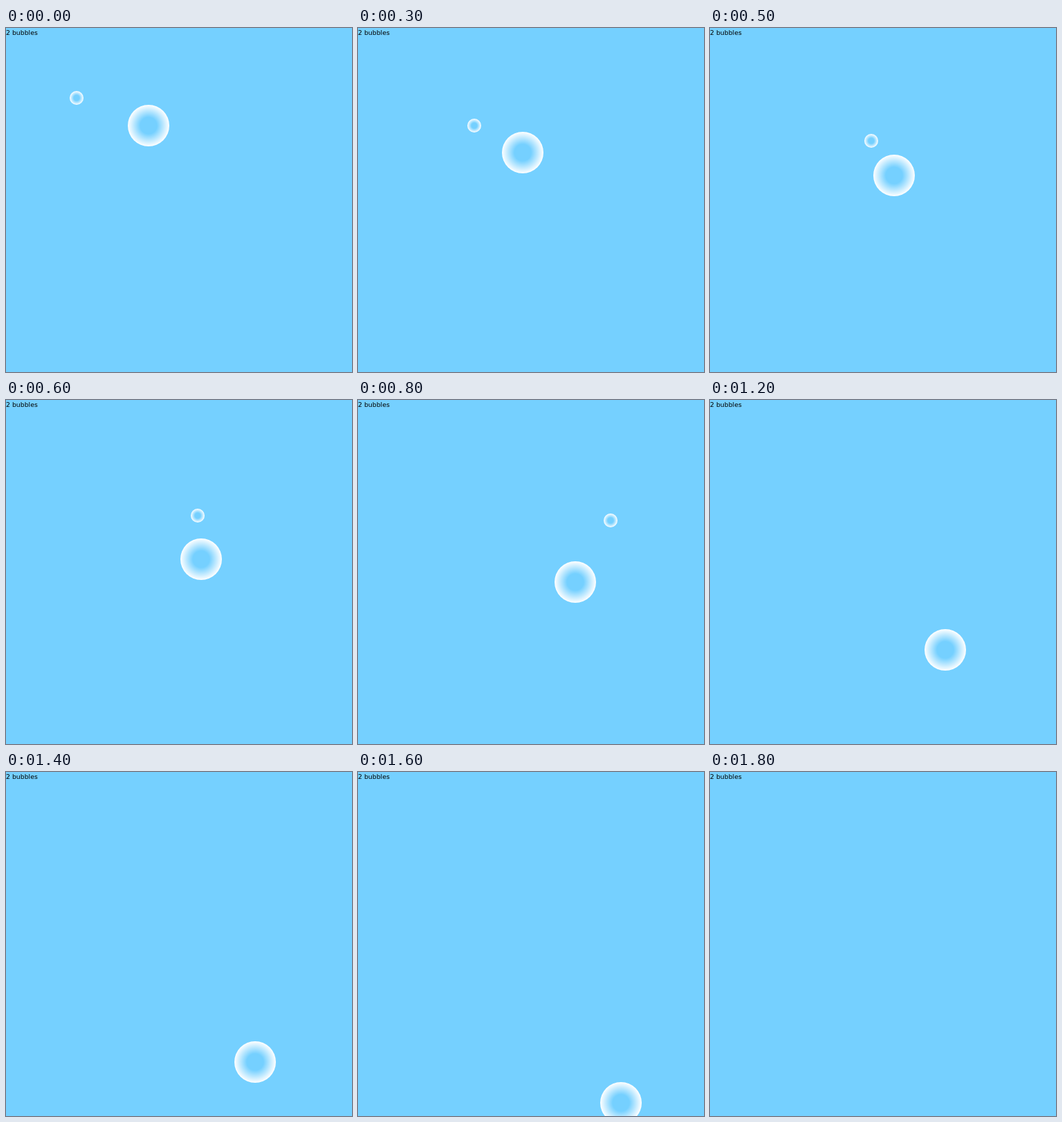
Recreate the animation shown at these times as an HTML page with a canvas. Size 500 by 497 pixels, loop 2.5 s.

```html
<!DOCTYPE html>
<html lang="en">
<head>
<meta charset="utf-8">
<title>Bubbles</title>
<style>
html, body { margin: 0; width: 100%; height: 100%; overflow: hidden; background: #75d0ff; }
canvas { display: block; }
</style>
</head>
<body>
<canvas id="stage" width="500" height="497"></canvas>
<script>
const ctx = document.getElementById('stage').getContext('2d');
const STEP = 100, LOOP = 2500, LAST = 18;

// Steps at which the drift changes; the last leg carries on past its end.
const turns = [0, 3, 5, 8, 10, 14];
const bubbles = [
  { r: 30, path: [[206, 141], [238, 180], [266, 213], [314, 263], [320, 302], [360, 419]] },
  { r: 10, path: [[102, 101], [168, 141], [233, 163], [365, 174], [433, 169], [661, 165]] }
];

function locate(path, step) {
  const next = turns.findIndex(t => t > step);
  const i = next < 0 ? turns.length - 1 : next;
  const k = (step - turns[i - 1]) / (turns[i] - turns[i - 1]);
  return path[i].map((end, axis) => {
    const from = path[i - 1][axis];
    return Math.round(from + (end - from) * k);
  });
}

function drawBubble(x, y, r) {
  const fill = ctx.createRadialGradient(x, y, r * 0.4, x, y, r);
  fill.addColorStop(0, 'rgba(255,255,255,0)');
  fill.addColorStop(1, '#fff');
  ctx.fillStyle = fill;
  ctx.beginPath();
  ctx.arc(x, y, r, 0, Math.PI * 2);
  ctx.fill();
}

function draw(ms) {
  const step = Math.min(LAST, Math.floor((ms % LOOP) / STEP));
  ctx.fillStyle = '#75d0ff';
  ctx.fillRect(0, 0, 500, 497);
  for (const b of bubbles) drawBubble(...locate(b.path, step), b.r);
  ctx.fillStyle = '#000';
  ctx.font = '7pt "DejaVu Sans", sans-serif';
  ctx.fillText(bubbles.length + ' bubbles', 0, 10);
}

const start = performance.now();
function tick() {
  draw(performance.now() - start);
  requestAnimationFrame(tick);
}
tick();
</script>
</body>
</html>
```
